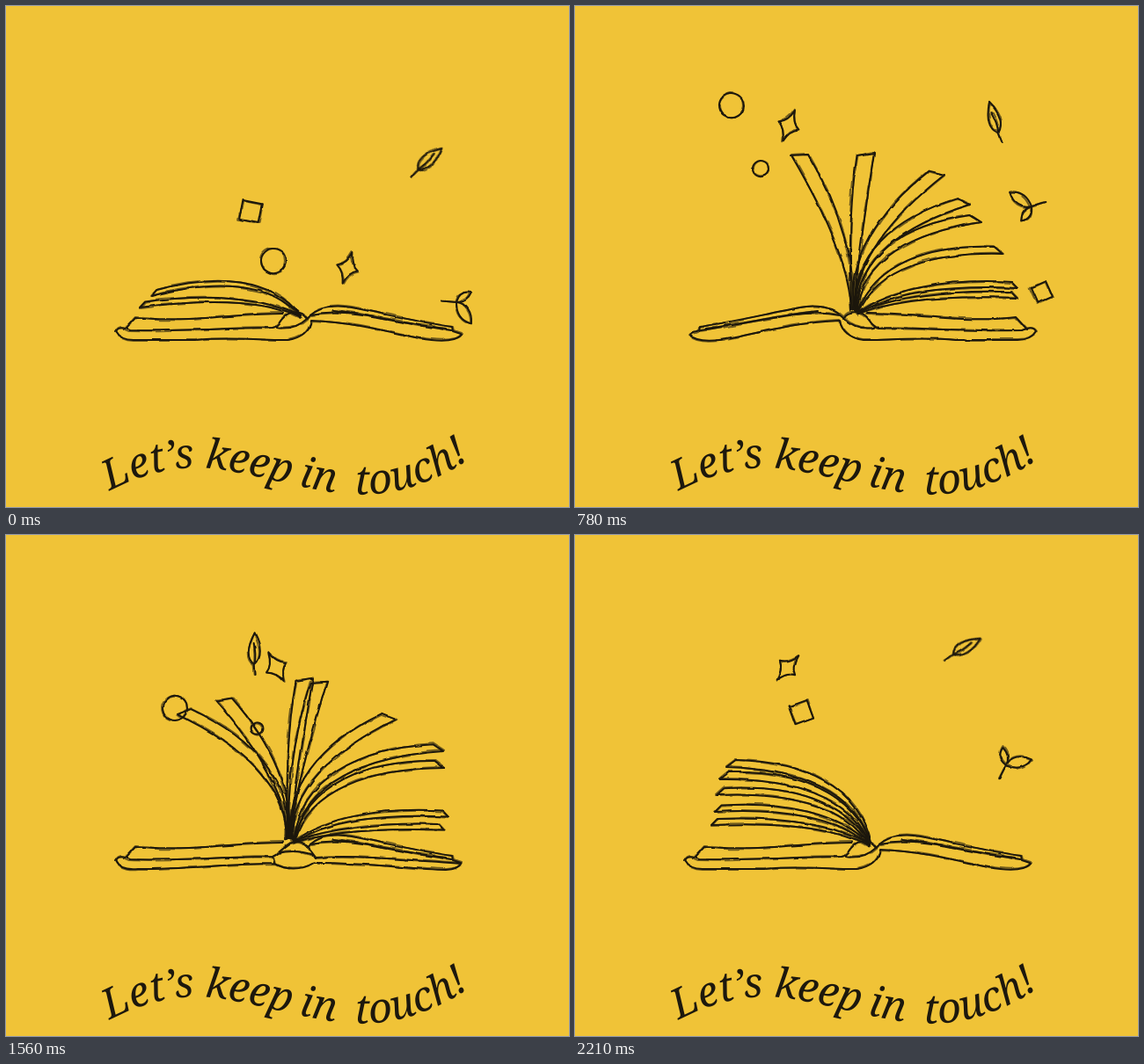
These frames come from a looping animation (640 by 570 pixels, 2.34 s). An HTML page:

```html
<!DOCTYPE html>
<html lang="en">
<head>
<meta charset="utf-8">
<title>Let’s keep in touch</title>
<style>
html, body { margin: 0; height: 100%; overflow: hidden; background: #f0c337; }
svg { display: block; width: 100vw; height: 100vh; }
#art path { fill: none; stroke: #1d180d; stroke-width: 2; stroke-linecap: round; stroke-linejoin: round; vector-effect: non-scaling-stroke; }
text { font: italic 47px "Noto Serif", "Liberation Serif", serif; fill: #1d180d; }
</style>
</head>
<body>
<svg viewBox="0 0 640 570">
  <defs>
    <filter id="rough" filterUnits="userSpaceOnUse" x="0" y="0" width="640" height="570" color-interpolation-filters="sRGB">
      <feTurbulence type="fractalNoise" baseFrequency=".05" numOctaves="2" seed="3"/>
      <feDisplacementMap in="SourceGraphic" scale="3" xChannelSelector="R" yChannelSelector="G"/>
    </filter>
    <filter id="rougher" filterUnits="userSpaceOnUse" x="0" y="0" width="640" height="570" color-interpolation-filters="sRGB">
      <feTurbulence type="fractalNoise" baseFrequency=".03" numOctaves="2" seed="8"/>
      <feDisplacementMap in="SourceGraphic" scale="7" xChannelSelector="R" yChannelSelector="G"/>
    </filter>
    <path id="wave" d="M118 552C160 529 200 522 240 527S320 545 370 553S480 555 560 492"/>
  </defs>
  <g filter="url(#rough)"><g id="art"></g></g>
  <g filter="url(#rougher)" opacity=".6"><use href="#art"/></g>
  <text><textPath href="#wave">Let’s</textPath></text>
  <text><textPath href="#wave" startOffset="112">keep</textPath></text>
  <text><textPath href="#wave" startOffset="221">in</textPath></text>
  <text><textPath href="#wave" startOffset="286">touch!</textPath></text>
</svg>
<script>
const STEP = 130, STEPS = 18, AXIS = 648, PAGES = 9;

// A pose holds the pivot, how much the pages curl, and each page as length and angle from upright
function pose([px, py], tips, curl = .45) {
  const pages = tips.map(([x, y]) => [Math.hypot(x - px, y - py), Math.atan2(x - px, py - y)]);
  return {pivot: [px, py], curl, pages};
}
const mirror = ({pivot: [x, y], curl, pages}) => ({
  pivot: [AXIS - x, y], curl, pages: pages.map(([r, a]) => [r, -a]).reverse()
});

// Page tips, from right to left
const closed = pose([340, 355], [[165, 330], [152, 343]], 1);
const fanned = pose([340, 355], [[172, 264], [165, 278], [161, 296], [159, 315], [155, 330]]);
const rising = pose([331, 350],
  [[518, 220], [483, 212], [357, 174], [239, 175], [187, 198], [145, 280], [146, 301], [148, 330]]);
const landing = pose([316, 352],
  [[503, 332], [503, 321], [486, 282], [462, 246], [449, 226], [420, 192], [340, 167], [246, 170]]);
const returning = pose([329, 350],
  [[501, 338], [508, 316], [498, 240], [492, 211], [406, 182], [276, 167], [261, 172], [157, 300], [132, 357]]);
const settling = pose([334, 352],
  [[401, 170], [360, 171], [249, 193], [209, 215], [186, 246], [163, 280], [145, 321], [146, 331]]);

const turns = [
  [0, closed], [1, fanned], [4, rising], [6, landing], [8, mirror(fanned)], [9, mirror(closed)],
  [10, mirror(fanned)], [13, returning], [15, settling], [17, fanned], [18, closed]
];

// Covers and spine
const stacks = 'M342 355C355 343 372 339 392 343C430 350 470 360 507 365L508 370L517 373' +
  'M347 352C385 344 420 356 506 369M372 347C420 352 460 363 500 367' +
  'M134 368L147 354C200 361 260 350 316 350';
const sideBase = stacks +
  'M342 356C336 347 322 347 314 357Q309 365 303 366C260 366 200 370 140 369Q128 363 124 370' +
  'Q130 380 145 380L215 380C260 376 300 381 320 380C335 378 345 370 347 358' +
  'C400 360 440 372 470 378Q508 385 518 374M308 366Q328 369 342 356';
const openBase = stacks +
  'M303 366C250 366 190 371 140 369Q128 363 124 370Q130 382 150 380C210 380 250 374 305 374' +
  'C318 381 335 382 350 373C400 372 460 380 500 381Q514 380 517 374C450 369 400 364 352 367' +
  'C346 360 342 350 331 350C320 349 314 362 303 366Q305 371 305 374M309 362Q330 357 349 364';

// Floating shapes, drawn around their own origin
const shapes = {
  circle: 'M1 0A1 1 0 1 1 .95 -.3L1 .1',
  arc: 'M-.9 -.6Q-.4 -1.1 .1 -1A1 1 0 0 1 0 1',
  square: 'M-.5 -.5H.5V.5H-.5V-.55',
  corner: 'M19 -8L0 0L7 18',
  sparkle: 'M0 -21Q3 -5 14 0Q3 5 0 21Q-3 6 -14 0Q-3 -5 0 -21',
  leaf: 'M-24 1L-12 0C-6 -10 8 -9 25 0C10 8 -4 9 -12 0Q0 2 13 -1',
  sprig: 'M-18 0L0 0C2 -11 9 -14 17 -13C14 -4 8 0 0 0C12 0 20 10 20 24C8 22 1 14 0 0'
};
// Shape, size, then keys: step, x, y, degrees
const floats = [
  ['circle', 14, [0, 304, 290, 0], [4, 148, 237, 0], [6, 178, 113, 0]],
  ['circle', 9, [3, 220, 215, 0], [4, 197, 181, 0], [6, 211, 185, 0], [10, 332, 103, 0]],
  ['circle', 14, [8, 290, 290, 0], [10, 246, 228, 0], [13, 165, 181, 0]],
  ['arc', 14, [15, 236, 74, 0]],
  ['circle', 6.5, [12, 285, 220, 0], [15, 140, 233, 0]],
  ['square', 22, [17, 257, 202, -20], [18, 278, 234, 11], [20, 310, 310, 30]],
  ['square', 12, [3, 360, 335, 0], [4, 394, 323, 6]],
  ['square', 18, [5, 465, 325, -10], [6, 531, 326, -24], [10, 494, 232, 16]],
  ['corner', 1, [13, 510, 202, 0], [15, 500, 163, -30]],
  ['sparkle', .88, [0, 388, 298, 17], [4, 285, 133, -42], [6, 243, 136, 22], [10, 285, 160, -10],
    [13, 318, 146, -37], [15, 222, 161, 62], [17, 242, 151, 42]],
  ['leaf', .97, [0, 477, 178, -41], [4, 462, 195, -32], [6, 478, 133, -107], [10, 394, 89, -18],
    [13, 227, 159, -126], [15, 280, 140, -44], [17, 440, 130, -31]],
  ['sprig', .95, [0, 512, 337, 5], [4, 514, 294, 52], [6, 519, 228, 163], [10, 412, 157, 42]],
  ['sprig', .95, [15, 376, 142, 118], [17, 490, 262, -63]]
];

const mix = (a, b, k) => a.map((v, i) => v + (b[i] - v) * k);

function span(keys, at) {
  const i = Math.max(0, keys.findLastIndex(k => k[0] <= at));
  const a = keys[i], b = keys[i + 1] || a;
  return [a, b, a === b ? 0 : (at - a[0]) / (b[0] - a[0])];
}

const path = (d, transform = '') => `<path d="${d}" transform="${transform}"/>`;

// Two faces that bow upwards; upright pages show a wider edge
function page([px, py], [length, angle], curl) {
  const sin = Math.sin(angle), cos = Math.cos(angle), side = angle < 0 ? -1 : 1;
  const bow = curl * length * sin * sin * cos, width = 6 + 13 * cos;
  const at = (along, up) => [
    px + sin * along * length - side * cos * up,
    py - cos * along * length - side * sin * up
  ].map(v => v.toFixed(1)).join(' ');
  return path(`M${at(.03, 0)}C${at(.25, 1.5 * bow)} ${at(.62, 1.15 * bow)} ${at(1, 0)}` +
    `L${at(.97, width)}C${at(.6, 1.15 * bow + width)} ${at(.25, 1.5 * bow + width * .4)} ${at(.03, 2)}`);
}

function pages(step) {
  const [[, a], [, b], k] = span(turns, step);
  if (!k) return a.pages.map(p => page(a.pivot, p, a.curl)).join('');
  const pivot = mix(a.pivot, b.pivot, k), [curl] = mix([a.curl], [b.curl], k);
  const pick = (p, i) => p.pages[Math.floor(i * p.pages.length / PAGES)];
  return Array.from({length: PAGES}, (_, i) => page(pivot, mix(pick(a, i), pick(b, i), k), curl)).join('');
}

function base(step) {
  if (step <= 2 || step >= 15) return path(sideBase);
  if (step >= 6 && step <= 11) return path(sideBase, `matrix(-1 0 0 1 ${AXIS} 0)`);
  return path(openBase);
}

function floating(step) {
  return floats.map(([kind, size, ...keys]) => {
    const at = step < keys[0][0] ? step + STEPS : step;
    if (at > keys.at(-1)[0]) return '';
    const [, x, y, turn] = mix(...span(keys, at));
    return path(shapes[kind], `translate(${x} ${y}) rotate(${turn}) scale(${size})`);
  }).join('');
}

const art = document.getElementById('art');
let shown = -1;
function draw() {
  const step = Math.floor(performance.now() / STEP) % STEPS;
  if (step !== shown) {
    art.innerHTML = base(step) + pages(step) + floating(step);
    shown = step;
  }
  requestAnimationFrame(draw);
}
draw();
</script>
</body>
</html>
```
